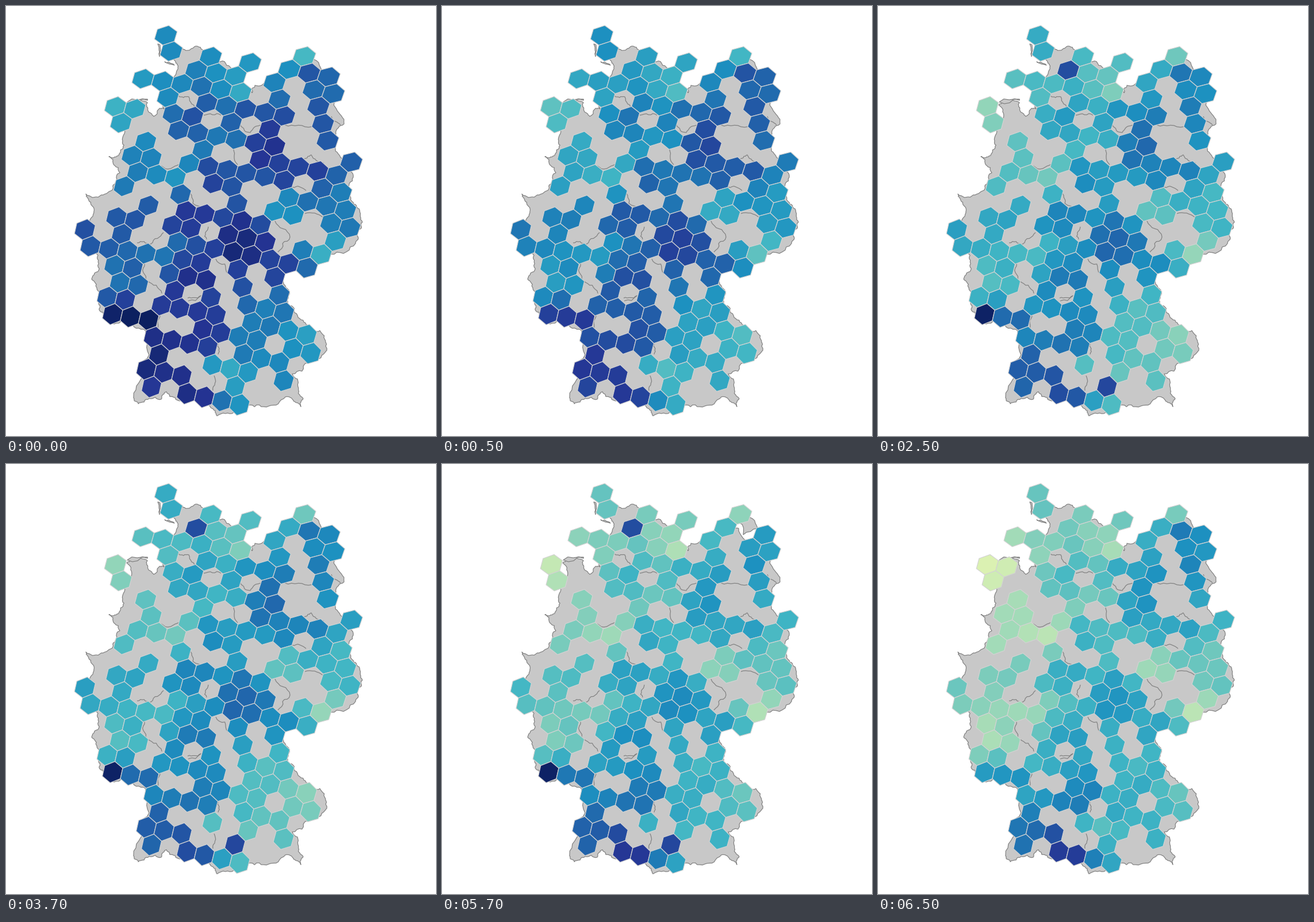
A matplotlib script that plays this animation: 748 px wide and 748 px high, repeating every 8 s.

```python
import random

import numpy as np
import matplotlib.pyplot as plt
from matplotlib.animation import FuncAnimation
from matplotlib.collections import LineCollection, PolyCollection

SIZE, DPI = 748, 100
LINE = 1.2 * 72 / DPI
GRAY = "#808080"

# Per grid row: first column, last column, empty columns.
ROWS = [
    (0, 7, range(1, 7)), (0, 8, (1, 3, 5)), (1, 8, (4, 6)),
    (-2, 7, (4, 6)), (-1, 7, (0, 6)), (-4, 7, (-2, 1, 3, 5, 6)),
    (-4, 8, (-3, -2, 5, 6, 7)), (-3, 7, (-2, -1, 1, 2)), (-4, 7, (-2, 5)),
    (-4, 7, (-1, 2, 3)), (-5, 7, (-4, -3, -1, 0, 2, 5)),
    (-4, 6, (-3, 3, 4, 5)), (-6, 5, (-4, -1, 3)), (-8, 4, (-7, -5, -4)),
    (-8, 2, (-1, 1)), (-7, 2, (-5, -1, 1)), (-7, 2, (-5, -3, -1)),
    (-8, 3, (-6, -1)), (-8, 3, (-5, -4, 1)), (-6, 1, (-2,)),
    (-6, 1, (-5, -4, 0)), (-7, -2, (-4, -3)), (-7, -2, (-6,)),
]

# Level of the first scene at a few cells: row, column, percent.
START = [
    (0, 0, 65), (0, 7, 51), (1, 7, 75), (3, -1, 61), (3, 3, 56), (4, 3, 80),
    (4, 7, 77), (5, -4, 53), (5, 0, 76), (6, 1, 67), (6, 4, 88), (7, 5, 85),
    (8, -3, 66), (9, 0, 81), (9, -2, 61), (9, 7, 67), (10, 3, 62),
    (11, -2, 85), (12, 1, 94), (12, 5, 53), (13, -7, 77), (13, 3, 85),
    (14, -4, 71), (15, -3, 89), (16, -7, 70), (16, 2, 67), (18, -7, 98),
    (17, 3, 60), (18, -3, 88), (19, -1, 66), (20, -2, 53), (20, -6, 92),
    (22, -5, 88),
]
# Change of level from scene to scene, in the same form.
CHANGES = [
    [(0, 0, -1), (1, 7, 1), (4, 1, -9), (9, -3, -11), (9, 5, -8),
     (14, -4, -10), (18, -7, -13), (17, 2, -11), (22, -6, -4)],
    [(0, 0, -9), (2, 6, -9), (5, -3, -10), (9, 5, -10), (14, -4, -11),
     (17, 2, -11), (18, -6, -14), (22, -4, -6)],
    [(0, 0, -11), (2, 7, -5), (6, 4, -11), (9, -3, -8), (12, 1, -9),
     (14, -6, -10), (18, 1, 7), (19, -6, -2), (22, -3, 10)],
    [(1, 0, 0), (2, 6, 4), (4, -4, -7), (12, -6, -8), (11, 1, -3),
     (17, -6, -8), (18, 2, 1), (22, -3, -1)],
]
# In the two middle scenes some cells jump out of the trend or lack data.
SPOTS = {(2, 1): 80, (18, -8): 97, (21, -2): 82}
MISSING = {(5, -3), (8, -4), (20, -2)}
RUEGEN = (1, 7)

NORTH_COAST = [
    (206, 222), (210, 172), (246, 168), (257, 192), (267, 178), (277, 181),
    (285, 135), (299, 107), (291, 92), (300, 73), (333, 70), (366, 95),
    (400, 132), (428, 151), (433, 138), (478, 115), (516, 112), (574, 150),
]
EAST_BORDER = [
    (588, 205), (572, 245), (603, 291), (602, 340), (620, 376), (608, 413),
    (530, 440), (480, 470), (492, 496), (490, 520), (525, 556), (556, 585),
    (553, 605), (498, 640), (517, 683), (513, 697), (486, 680),
]
SOUTH_WEST = [
    (424, 694), (367, 713), (340, 690), (294, 681), (279, 671), (270, 684),
    (230, 692), (222, 680), (246, 580), (243, 565), (180, 549), (162, 528),
    (165, 502), (149, 475), (160, 434), (143, 400), (153, 357), (139, 327),
    (185, 320), (198, 290), (179, 262), (196, 260),
]
ISLANDS = [
    [(264, 66), (268, 68), (267, 88)],
    [(276, 97), (284, 98), (293, 103)],
    [(211, 167), (246, 162), (246, 164)],
    [(517, 102), (540, 95), (549, 112), (524, 123)],
]
INNER = [
    [(300, 156), (318, 158), (334, 178)], [(344, 190), (374, 190)],
    [(408, 207), (425, 220), (443, 207)], [(485, 207), (532, 210)],
    [(566, 192), (582, 207)], [(394, 244), (403, 276)],
    [(270, 278), (302, 275)], [(519, 266), (531, 259), (553, 273)],
    [(498, 315), (522, 321)], [(520, 361), (552, 368)],
    [(320, 322), (325, 343), (340, 350)], [(352, 384), (349, 406)],
    [(228, 412), (252, 414), (274, 394)],
    [(468, 374), (494, 402), (473, 428)],
    [(241, 448), (246, 478), (271, 500)], [(365, 440), (386, 466)],
    [(316, 508), (339, 504), (317, 513)], [(268, 538), (264, 566)],
    [(369, 586), (369, 606)], [(362, 643), (360, 669)],
]


def place(row, col):
    """Grid indices, also fractional, to stage pixels."""
    x = 278 + 9.5 * row - 0.04 * row**2 + (34.4 - 0.17 * row) * col
    y = (51 + 27.77 * row + 0.095 * row**2
         + (4.15 + 0.155 * row) * col + 0.155 * col**2)
    return np.stack([x, y], axis=-1)


def hexagon(row, col):
    turn = np.radians(60) * np.arange(6)
    return place(row + 2 / 3 * np.cos(turn), col - 2 / 3 * np.cos(turn + np.pi / 3))


def roughen(points, depth=3):
    """Make a polyline ragged by moving segment midpoints sideways."""
    for _ in range(depth):
        out = []
        for (x0, y0), (x1, y1) in zip(points, points[1:]):
            k = rng.uniform(-0.2, 0.2)
            out += [(x0, y0), ((x0 + x1) / 2 - k * (y1 - y0),
                               (y0 + y1) / 2 + k * (x1 - x0))]
        points = out + [points[-1]]
    return points


def closed(points, depth):
    return roughen(points + points[:1], depth)


def spread(samples, power):
    """Inverse-distance interpolation of sample values to all cells."""
    row, col, value = np.array(samples, float).T
    dist = np.linalg.norm(centers[:, None] - place(row, col), axis=-1)
    weight = 1 / (dist + 0.01) ** power
    return weight @ value / weight.sum(axis=1)


rng = random.Random(4)
cells = [(r, c) for r, (first, last, gaps) in enumerate(ROWS)
         for c in range(first, last + 1) if c not in gaps]
centers = place(*np.array(cells, float).T)
hexagons = [hexagon(r, c) for r, c in cells]

texture = np.array([rng.uniform(-2.5, 2.5) for _ in cells])
levels = [spread(START, 3.5) + texture]
for change in CHANGES:
    levels.append(levels[-1] + spread(change, 2.5))

cmap = plt.get_cmap("YlGnBu")
scenes = []
for k, level in enumerate(levels):
    middle = k in (2, 3)
    spots = SPOTS if middle else {}
    hidden = MISSING if middle else set()
    if k == 3:
        hidden = hidden | {RUEGEN}
    shown = [i for i, cell in enumerate(cells) if cell not in hidden]
    values = [spots.get(cells[i], level[i]) / 100 for i in shown]
    scenes.append(([hexagons[i] for i in shown], cmap(values)))

fig = plt.figure(figsize=(SIZE / DPI, SIZE / DPI), dpi=DPI, facecolor="white")
ax = fig.add_axes([0, 0, 1, 1])
ax.set(xlim=(0, SIZE), ylim=(SIZE, 0))
ax.axis("off")

land = [closed(NORTH_COAST + EAST_BORDER + SOUTH_WEST, 4)]
land += [closed(shape, 2) for shape in ISLANDS]
ax.add_collection(PolyCollection(land, facecolors="#c8c8c8",
                                 edgecolors=GRAY, linewidths=LINE))
ax.add_collection(LineCollection([roughen(line) for line in INNER],
                                 colors=GRAY, linewidths=LINE))
tiles = PolyCollection([], edgecolors="#d3d3d3", linewidths=LINE, zorder=3)
ax.add_collection(tiles)


def draw(i):
    shapes, colors = scenes[(i + 3) // 4]
    tiles.set_verts(shapes)
    tiles.set_facecolor(colors)
    return (tiles,)


anim = FuncAnimation(fig, draw, frames=16, interval=500, repeat=True,
                     repeat_delay=0)
plt.show()
```
